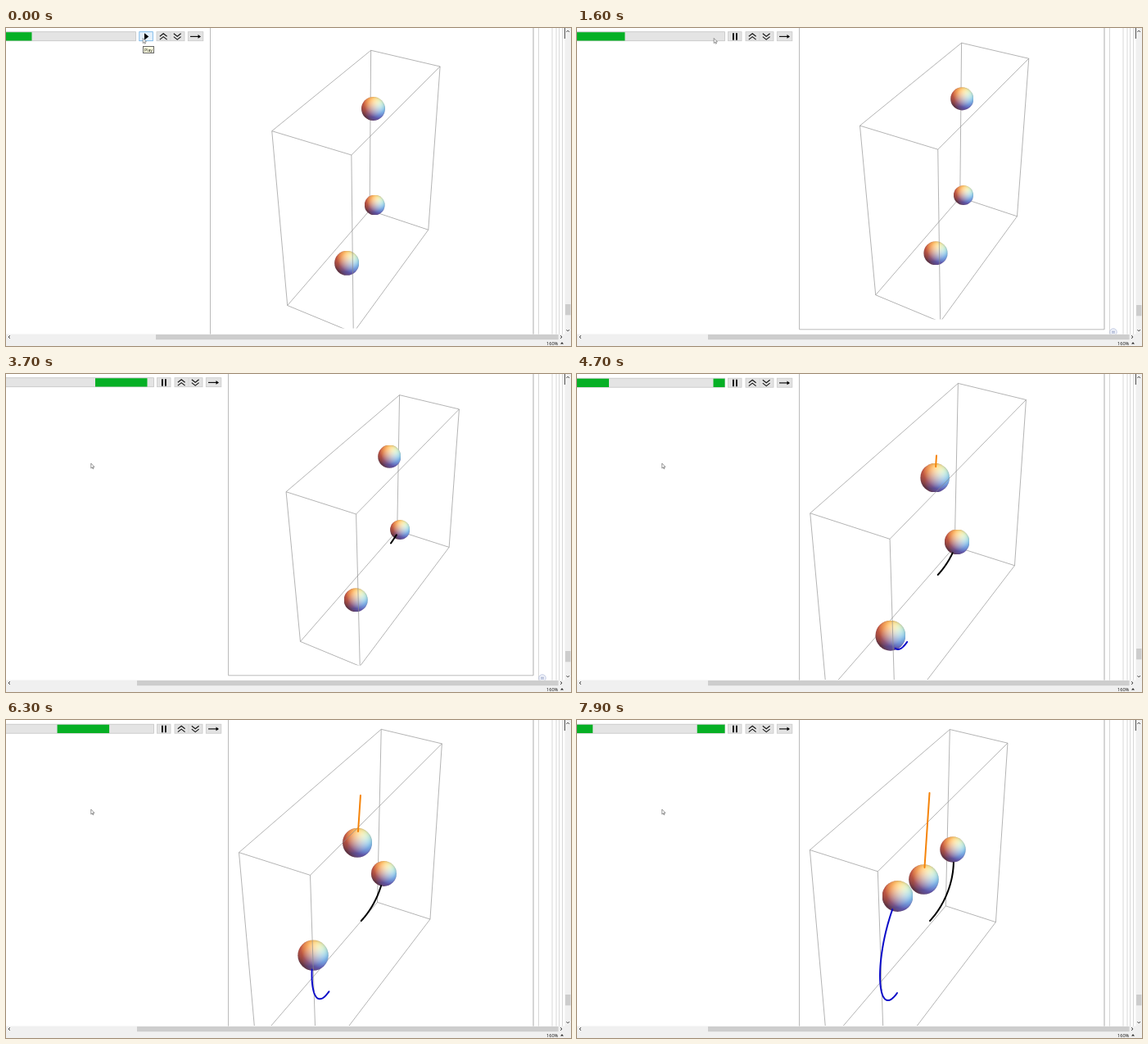
An HTML page with a canvas that plays this animation: 690x388 px, repeating every 8 s.

```html
<!DOCTYPE html>
<html>
<head>
<meta charset="utf-8">
<style>
  html, body { margin: 0; width: 100%; height: 100%; overflow: hidden; background: #fff; }
  canvas { display: block; position: absolute; left: 0; top: 0; }
  span { position: absolute; font: 5.6px/8px "Open Sans", sans-serif; color: #111; white-space: nowrap; }
  #zoom { left: 660px; top: 380.5px; }
  #tip { left: 167px; top: 22px; width: 14px; height: 9px; box-sizing: border-box; text-align: center;
         background: #ffffe1; border: .7px solid #666; font-size: 5.2px; line-height: 8px; }
</style>
</head>
<body>
<canvas id="stage" width="690" height="388"></canvas>
<span id="zoom">160%</span>
<span id="tip">Play</span>
<script>
const LOOP = 8000, TICK = 100;
const PRESS = 800, PLAY = 1100, ZOOM = 4300;
const ctx = document.getElementById('stage').getContext('2d');
const tip = document.getElementById('tip');

// Box poses: half width, half depth, half height, scale, centre x, centre y
const STILL = [.185, .43, .5, 858, 435.2, 195.4];
const EARLY = [[.1865, .455, .5, 831, 457, 183.4], [.163, .5, .426, 860, 457.6, 183]];
const LATE = [[.145, .5, .374, 1153, 432, 206], [.127, .5, .446, 1067, 417, 210]];

// near: places before the zoom; start: where the trail begins after it (both from the box centre)
// path: curve travelled, from share u0 on; hide: share of the radius that covers the trail
const BALLS = [
  { color: '#f5840a', r: 14.1, hide: .76, u0: .23, near: [[13.3, -97], [10.7, -82.3]],
    start: [[9, -104], [13.5, -121]], path: [[-2.3, 35], [-4.7, 70], [-7, 105.5]] },
  { color: '#000', r: 12.1, hide: .94, u0: .52, near: [[15, 20.6], [23.6, 7]],
    start: [[11, 39], [14, 35]], path: [[17, -18], [33, -51], [28, -87]] },
  { color: '#0a0ac8', r: 14.6, hide: .9, u0: .4, near: [[-19, 91.4], [-30.4, 92.8]],
    start: [[-26, 119.5], [-26, 123]], path: [[-26, 37], [-30, -47], [.5, -118]] }
];

// Key points of the green block: time, left end
const BAR = [[0, -32], [1100, -32], [1600, -5], [2700, 29], [3700, 109], [5300, 201], [8000, 343]];

const mix = (a, b, k) => a + (b - a) * k;
const mixAll = ([a, b], k) => a.map((v, i) => mix(v, b[i], k));
const add = (a, b) => a.map((v, i) => v + b[i]);
const dot = (a, b) => a.reduce((sum, v, i) => sum + v * b[i], 0);
const unit = a => a.map(v => v / Math.hypot(...a));
const cross = ([a, b, c], [x, y, z]) => [b * z - c * y, c * x - a * z, a * y - b * x];
const clamp01 = k => Math.max(0, Math.min(1, k));

// Camera looking at the middle of the box
const EYE = [1.3, -2.4, 2], BACKWARD = unit(EYE);
const RIGHT = unit(cross([0, 0, 1], BACKWARD)), UP = cross(BACKWARD, RIGHT);

function boxCorners([w, d, h, scale, cx, cy]) {
  const corners = [];
  for (const z of [h, -h]) {
    for (const [x, y] of [[-w, d], [w, d], [w, -d], [-w, -d]]) {
      const p = [x, y, z], k = scale / (Math.hypot(...EYE) - dot(p, BACKWARD));
      corners.push([cx + k * dot(p, RIGHT), cy - k * dot(p, UP)]);
    }
  }
  return corners;
}

function linear(keys, t) {
  const i = keys.findIndex(k => k[0] > t), [a, b] = [keys[i - 1], keys[i]];
  return mix(a[1], b[1], (t - a[0]) / (b[0] - a[0]));
}

function along([p, q, r], u) {
  const v = 1 - u, a = 3 * u * v * v, b = 3 * u * u * v, c = u ** 3;
  return [0, 1].map(i => a * p[i] + b * q[i] + c * r[i]);
}

function rect(x, y, w, h, fill, border) {
  ctx.fillStyle = fill;
  ctx.fillRect(x, y, w, h);
  if (border) {
    ctx.strokeStyle = border;
    ctx.lineWidth = .8;
    ctx.strokeRect(x, y, w, h);
  }
}

function line(points, color, width) {
  ctx.beginPath();
  points.forEach(p => ctx.lineTo(...p));
  ctx.strokeStyle = color;
  ctx.lineWidth = width;
  ctx.stroke();
}

function fillShape(points, color) {
  ctx.beginPath();
  points.forEach(p => ctx.lineTo(...p));
  ctx.closePath();
  ctx.fillStyle = color;
  ctx.fill();
}

function chevron(x, y, w, h, color, width) {
  line([[x - w, y + h], [x, y], [x + w, y + h]], color, width);
}

// A white ball under a dim ambient light and three coloured lamps
function litBall(size) {
  const lamps = [
    { dir: unit([1.5, -.5, 1.5]), rgb: [0, .18, .53] },
    { dir: unit([1.5, 1.5, 1.5]), rgb: [.18, .5, .18] },
    { dir: unit([-.5, 1.5, 1.5]), rgb: [.5, .18, 0] }
  ];
  const sprite = document.createElement('canvas');
  sprite.width = sprite.height = size;
  const g = sprite.getContext('2d'), img = g.createImageData(size, size);
  for (let i = 0; i < size * size; i++) {
    let x = (i % size + .5) / size * 2 - 1, y = 1 - (Math.floor(i / size) + .5) / size * 2;
    const len = Math.max(1, Math.hypot(x, y));
    x /= len;
    y /= len;
    const normal = [x, y, Math.sqrt(Math.max(0, 1 - x * x - y * y))];
    const rgb = [.37, .2, .26];
    for (const lamp of lamps) {
      const k = Math.max(0, dot(normal, lamp.dir));
      lamp.rgb.forEach((v, c) => rgb[c] += v * k);
    }
    img.data.set([...rgb.map(v => v * 255), 255], i * 4);
  }
  g.putImageData(img, 0, 0);
  return sprite;
}
const BALL = litBall(64);

function drawBall([x, y], r) {
  ctx.save();
  ctx.beginPath();
  ctx.arc(x, y, r, 0, 7);
  ctx.clip();
  ctx.drawImage(BALL, x - r, y - r, 2 * r, 2 * r);
  ctx.restore();
}

function trail(pointAt, center, gap, color) {
  const pts = [];
  for (let k = 0; k <= 1; k += 1 / 80) {
    const p = pointAt(k);
    if (Math.hypot(p[0] - center[0], p[1] - center[1]) < gap) break;
    pts.push(p);
  }
  ctx.lineCap = 'round';
  if (pts.length) line(pts, color, 2);
  ctx.lineCap = 'butt';
}

function plot(t) {
  const late = t >= ZOOM, still = t < PLAY;
  const s = clamp01((t - ZOOM) / 3600);
  const ease = late ? 1 - (1 - s) ** 1.8 : Math.max(0, (t - 1600) / 2100) ** 1.8;
  const pose = still ? STILL : mixAll(late ? LATE : EARLY, ease);
  const middle = pose.slice(4), corners = boxCorners(pose);
  const edge = (a, b) => line([corners[a], corners[b]], '#8c8c8c', .65);
  const grow = late ? 1.26 + .04 * s : still ? 1.03 : 1;

  const balls = BALLS.map(b => {
    const u = mix(b.u0, 1, s ** 1.5);
    const from = add(middle, mixAll(late ? b.start : b.near, ease));
    const at = k => add(from, along(b.path, u * k));
    return { ...b, at, center: late ? at(1) : from, r: b.r * grow };
  });

  ctx.save();
  ctx.beginPath();
  ctx.rect(251, 0, 392, late ? 373 : still ? 366.5 : 355.5);
  ctx.clip();
  for (const i of [0, 5, 7]) edge(4, i);
  balls.forEach(b => drawBall(b.center, b.r));
  for (let i = 0; i < 4; i++) {
    edge(i, (i + 1) % 4);
    if (i) edge(i, i + 4);
  }
  edge(5, 6);
  edge(6, 7);
  if (late) {
    balls.forEach(b => trail(b.at, b.center, b.r * b.hide, b.color));
  } else if (t >= 2400) {
    const c = balls[1].center;
    trail(k => mixAll([[470, 206.5], c], k), c, 7.6, '#000');
  }
  ctx.restore();
}

function controls(t) {
  const playing = t >= PLAY, dx = playing ? 22 : 0;
  const end = 158.5 + dx, top = 4.5, face = '#e3e3e3', rim = '#c9c9c9';
  ctx.save();
  ctx.translate(0, t >= ZOOM ? .7 : .2);
  rect(-2, top, end + 2, 11, '#e4e4e4', '#c4c4c4');

  const start = linear(BAR, t);
  for (let lap = 0; lap < (playing ? 3 : 1); lap++) {
    const x = start - lap * 191, a = Math.max(0, x), b = Math.min(end, x + 63.5);
    if (b > a) rect(a, 5, b - a, 10.3, '#06b025');
  }

  if (playing) {
    rect(184.5, top, 16.5, 11, face, rim);
    for (const x of [190, 194]) rect(x, 6, 1.8, 8.5, '#000');
  } else {
    const pressed = t >= PRESS;
    rect(162.8, top, 16.5, 11, pressed ? '#cce4f7' : '#e5f1fb', pressed ? '#2a7ac0' : '#69aee6');
    fillShape([[169, 6], [174.3, 10.2], [169, 14.4]], '#000');
  }
  ctx.translate(dx, 0);
  rect(184, top, 34, 11, face, rim);
  line([[201, 5], [201, 15]], '#d0d0d0', .7);
  for (const y of [6.6, 10.4]) {
    chevron(192.2, y, 4.4, 3.5, '#111', 1.1);
    chevron(209.2, y + 3.5, 4.4, -3.5, '#111', 1.1);
  }
  rect(222.3, top, 18.5, 11, face, rim);
  line([[225, 10.2], [236, 10.2]], '#000', 1.1);
  fillShape([[234.5, 7.8], [238, 10.2], [234.5, 12.6]], '#000');
  ctx.restore();
}

function windowFrame(t) {
  const still = t < PLAY, late = t >= ZOOM, framed = !still && !late;
  const left = still ? 249.5 : 271.5, bottom = framed ? 367.8 : 374;
  line([[left, 0], [left, bottom]], '#b4b4b4', .9);
  line([[644, 0], [644, bottom]], '#a2a2a2', .9);
  for (const x of [650.5, 667, 672, 675.5, 679.5]) line([[x, 0], [x, 374]], '#cfcfcf', .8);
  if (framed) {
    line([[left, bottom], [644, bottom]], '#b4b4b4', .9);
    ctx.beginPath();
    ctx.arc(655, 371, 4.2, 0, 7);
    ctx.fillStyle = '#f3f5fb';
    ctx.fill();
    ctx.strokeStyle = '#b3bddb';
    ctx.lineWidth = .8;
    ctx.stroke();
    for (const y of [370.2, 372]) line([[653, y], [657, y]], '#7787b5', .7);
  }

  rect(682.5, 0, 7.5, 374, '#f0f0f0');
  rect(683, still ? 337 : late ? 335 : 338, 6.5, 13.3, '#cdcdcd');
  line([[682.4, 0], [682.4, 13]], '#333', .9);
  chevron(686.2, 3, 1.8, 2, '#444', .9);
  chevron(686.2, 370, 1.8, -2, '#444', .9);

  rect(0, 373.5, 690, 14.5, '#f0f0f0');
  const x = still ? 183 : 160;
  rect(x, 374, 674.5 - x, 6.2, '#cdcdcd');
  line([[5, 375.2], [3, 377], [5, 378.8]], '#333', .9);
  line([[677, 375.2], [679, 377], [677, 378.8]], '#333', .9);
  fillShape([[677, 385.6], [679, 383.2], [681, 385.6]], '#222');
}

function cursor(t) {
  const tipAt = mixAll([[167.2, 12.5], [103.8, 109]], clamp01((t - 1700) / 700));
  const shape = [[0, 0], [0, 6], [1.4, 4.8], [2.3, 6.8], [3.2, 6.4], [2.3, 4.4], [4.2, 4.4]]
    .map(p => add(tipAt, p));
  fillShape(shape, '#fff');
  line([...shape, shape[0]], '#555', .6);
}

function draw(now) {
  const t = Math.floor(now % LOOP / TICK) * TICK;
  rect(0, 0, 690, 388, '#fff');
  plot(t);
  windowFrame(t);
  controls(t);
  cursor(t);
  tip.style.display = t < PRESS ? 'block' : 'none';
}

let begin;
function frame(now) {
  begin ??= now;
  draw(now - begin);
  requestAnimationFrame(frame);
}
draw(0);
requestAnimationFrame(frame);
</script>
</body>
</html>
```
